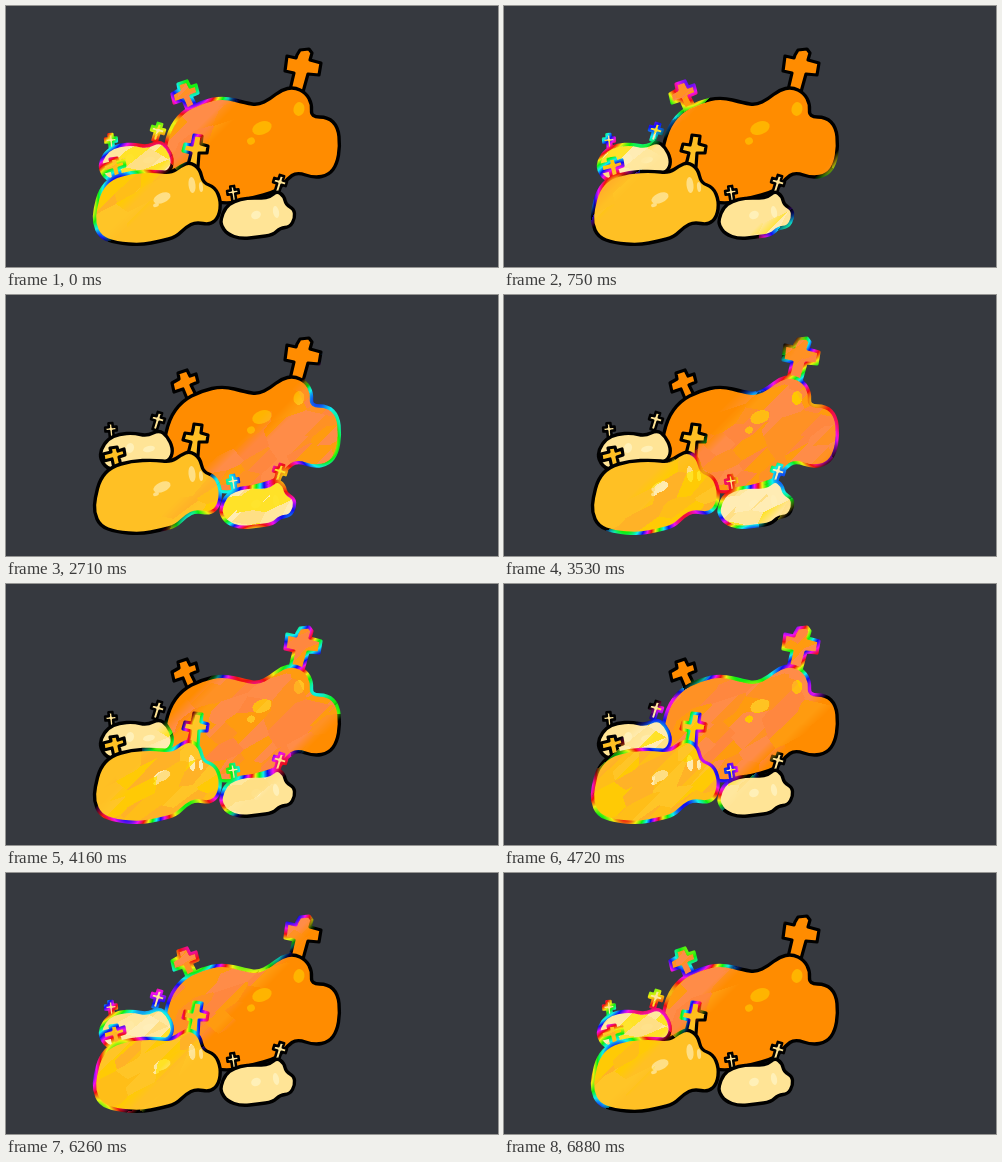
An HTML page with a canvas that plays this animation: 492 by 261 pixels, repeating every 6950 ms.

```html
<!DOCTYPE html>
<html>
<head>
<meta charset="utf-8">
<style>
html, body { margin: 0; width: 100%; height: 100%; overflow: hidden; background: #36393f; }
canvas { display: block; }
</style>
</head>
<body>
<canvas id="stage" width="492" height="261"></canvas>
<script>
const W = 492, H = 261, LOOP = 6950, STEP = 70;
const ORANGE = '#ff8c00', GOLD = '#ffc024', CREAM = '#ffe496';
const BOX = { x: 84, y: 37, w: 256, h: 208 };
const out = document.getElementById('stage').getContext('2d');

// ---- scene ----
function smooth(g, p) {
  const n = p.length / 2, at = i => [p[(i % n) * 2], p[(i % n) * 2 + 1]];
  const mid = (a, b) => [(a[0] + b[0]) / 2, (a[1] + b[1]) / 2];
  g.beginPath();
  g.moveTo(...mid(at(0), at(1)));
  for (let i = 1; i <= n; i++) g.quadraticCurveTo(...at(i), ...mid(at(i), at(i + 1)));
  g.closePath();
}

function paint(g, fill, line, width) {
  g.fillStyle = fill;
  g.strokeStyle = line;
  g.lineWidth = width;
  g.lineJoin = 'round';
  g.fill();
  g.stroke();
}

function blob(g, p, fill, line) {
  smooth(g, p);
  paint(g, fill, line, 3.4);
}

function poly(g, p, fill, line) {
  g.beginPath();
  for (let i = 0; i < p.length; i += 2) g.lineTo(p[i], p[i + 1]);
  g.closePath();
  paint(g, fill, line, 3.2);
}

function cross(g, x, y, size, angle, fill, line) {
  const a = 0.15 * size, b = 0.44 * size, top = -0.45 * size, foot = 0.75 * size;
  g.save();
  g.translate(x, y);
  g.rotate(angle);
  g.beginPath();
  for (const [px, py] of [[-a, top], [a, top], [a, -a], [b, -a], [b, a], [a, a],
    [a, foot], [-a, foot], [-a, a], [-b, a], [-b, -a], [-a, -a]]) g.lineTo(px, py);
  g.closePath();
  paint(g, fill, line, 2.6);
  g.restore();
}

function spot(g, x, y, rx, ry, angle, fill) {
  g.fillStyle = fill;
  g.beginPath();
  g.ellipse(x, y, rx, ry, angle, 0, 7);
  g.fill();
}

function scene(line) {
  const c = document.createElement('canvas');
  c.width = W;
  c.height = H;
  const g = c.getContext('2d', { willReadFrequently: true });
  g.fillStyle = '#36393f';
  g.fillRect(0, 0, W, H);

  poly(g, [291,49, 294,44, 303,43, 306,47, 304,54, 315,57, 313,69, 302,68, 297,86, 284,84, 288,67, 279,65, 281,50, 290,52], ORANGE, line);
  poly(g, [173,84, 172,78, 181,75, 184,81, 190,79, 192,87, 185,90, 191,102, 182,106, 177,94, 168,97, 166,88], ORANGE, line);
  blob(g, [157,152, 163,124, 176,106, 195,96, 217,91, 240,97, 252,99, 264,93, 275,84, 288,81, 300,87, 306,98, 305,111,
    322,111, 332,121, 334,140, 331,158, 323,169, 308,172, 291,166, 281,173, 272,185, 243,193, 215,199, 190,185, 165,170], ORANGE, line);
  spot(g, 256, 122, 10, 6.5, -0.35, '#ffb400');
  spot(g, 245, 135, 4, 3.5, -0.4, '#ffb400');
  spot(g, 293, 103, 5.5, 7, 0.2, '#ffb400');

  cross(g, 105, 134, 13, -0.1, CREAM, line);
  cross(g, 152, 124, 15, 0.3, CREAM, line);
  blob(g, [94,165, 95,154, 102,144, 113,139, 128,138, 141,141, 153,135, 161,141, 167,153, 165,164, 155,169, 130,174, 104,176], CREAM, line);
  spot(g, 124, 153, 4, 5, 0.3, '#fff0b8');
  spot(g, 143, 154, 6, 3, -0.2, '#fff0b8');

  poly(g, [187,135, 188,129, 196,130, 195,138, 202,140, 201,147, 193,147, 192,161, 182,159, 185,147, 177,145, 179,138, 186,139], GOLD, line);
  poly(g, [105,157, 104,153, 111,152, 112,156, 118,154, 119,160, 113,162, 115,171, 108,173, 106,164, 98,166, 97,159], GOLD, line);
  blob(g, [89,203, 94,184, 105,172, 125,166, 148,165, 165,167, 175,160, 184,156, 194,163, 197,177, 209,181, 215,195, 213,211,
    204,219, 190,216, 180,221, 170,231, 155,235, 135,239, 110,237, 94,231, 88,217], GOLD, line);
  spot(g, 156, 192, 9, 5, -0.4, '#ffdf85');
  spot(g, 150, 199, 3, 2, -0.4, '#ffdf85');
  spot(g, 186, 179, 3.5, 8, -0.1, '#ffdf85');
  spot(g, 195, 181, 2, 5, -0.1, '#ffdf85');

  cross(g, 227, 186, 13, -0.15, CREAM, line);
  cross(g, 274, 176, 15, 0.3, CREAM, line);
  blob(g, [215,213, 219,202, 228,195, 241,192, 256,192, 264,191, 271,185, 278,190, 280,199, 288,203, 289,212, 284,221,
    274,222, 267,229, 252,231, 235,233, 221,228, 215,219], CREAM, line);
  spot(g, 250, 209, 5, 4, -0.4, '#fff0b8');
  spot(g, 270, 206, 3, 6, -0.2, '#fff0b8');
  return g.getImageData(BOX.x, BOX.y, BOX.w, BOX.h).data;
}

// ---- shimmer ----
const TINTS = [
  [[255, 140, 85], [255, 146, 42], [255, 134, 74], [255, 158, 18]],
  [[255, 204, 0], [255, 176, 40], [255, 190, 22], [255, 198, 40]],
  [[255, 226, 20], [255, 238, 185], [255, 222, 130], [255, 232, 160]]
];

const hash = (a, b) => {
  const v = Math.sin(a * 127.1 + b * 311.7) * 43758.5453;
  return v - Math.floor(v);
};

// slanted shards: nearest seed in a rotated, stretched grid
function shard(x, y) {
  const u = (x * 0.88 - y * 0.47) / 34, v = (x * 0.47 + y * 0.88) / 15;
  const iu = Math.floor(u), iv = Math.floor(v);
  let best = 9, id = 0;
  for (let a = iu - 1; a <= iu + 1; a++) {
    for (let b = iv - 1; b <= iv + 1; b++) {
      const d = (a + hash(a, b) - u) ** 2 + (b + hash(b, a + 9) - v) ** 2;
      if (d < best) { best = d; id = hash(a + 3, b + 5); }
    }
  }
  return id;
}

const dark = scene('#000'), light = scene('#fff');
const frame = out.createImageData(BOX.w, BOX.h);
frame.data.set(dark);

const pixels = [];
for (let y = 0; y < BOX.h; y++) {
  for (let x = 0; x < BOX.w; x++) {
    const i = (y * BOX.w + x) * 4;
    const line = (light[i] - dark[i]) / 255;
    const filled = dark[i] > 130;
    if (line < 0.02 && !filled) continue;
    const px = x + BOX.x, py = y + BOX.y, id = shard(px, py);
    const far = 440 - px - py;
    const green = dark[i + 1] / (1 - Math.min(line, 0.9));
    pixels.push({
      i, line, filled, id,
      start: 1520 + far * 19 + (id - 0.5) * 420,
      span: 3200 + far * 2,
      kind: green < 165 ? 0 : green < 210 ? 1 : 2,
      hue: 0.55 + 0.32 * Math.sin(px / 13 + py / 31) + 0.3 * Math.sin(py / 15 - px / 27) + id * 0.25
    });
  }
}

const mod = (a, n) => ((a % n) + n) % n;
const clamp = v => Math.max(0, Math.min(1, v));
const rainbow = (h, k) => clamp(Math.abs(mod(h * 6 + k, 6) - 3) - 1);

function draw(t) {
  const d = frame.data;
  for (const p of pixels) {
    const age = mod(t - p.start, LOOP), i = p.i;
    const on = age < p.span;
    const glow = on ? clamp(Math.min(age, p.span - age) / 320) : 0;
    const tint = TINTS[p.kind][Math.floor(p.id * 4 + age / 800) % 4];
    const hue = p.hue + age / 1700;
    for (let k = 0; k < 3; k++) {
      let v = dark[i + k];
      if (p.filled && on) v += (tint[k] * (1 - p.line) - v) * glow * 0.85;
      if (p.line && on) v += p.line * glow * (15 + 225 * rainbow(hue, [0, 4, 2][k]));
      d[i + k] = v;
    }
  }
  out.putImageData(frame, BOX.x, BOX.y);
}

out.fillStyle = '#36393f';
out.fillRect(0, 0, W, H);
const begin = performance.now();
let last = -1;
function tick(now) {
  const t = Math.floor(mod(Math.max(0, now - begin), LOOP) / STEP) * STEP;
  if (t !== last) draw(last = t);
  requestAnimationFrame(tick);
}
draw(0);
requestAnimationFrame(tick);
</script>
</body>
</html>
```
